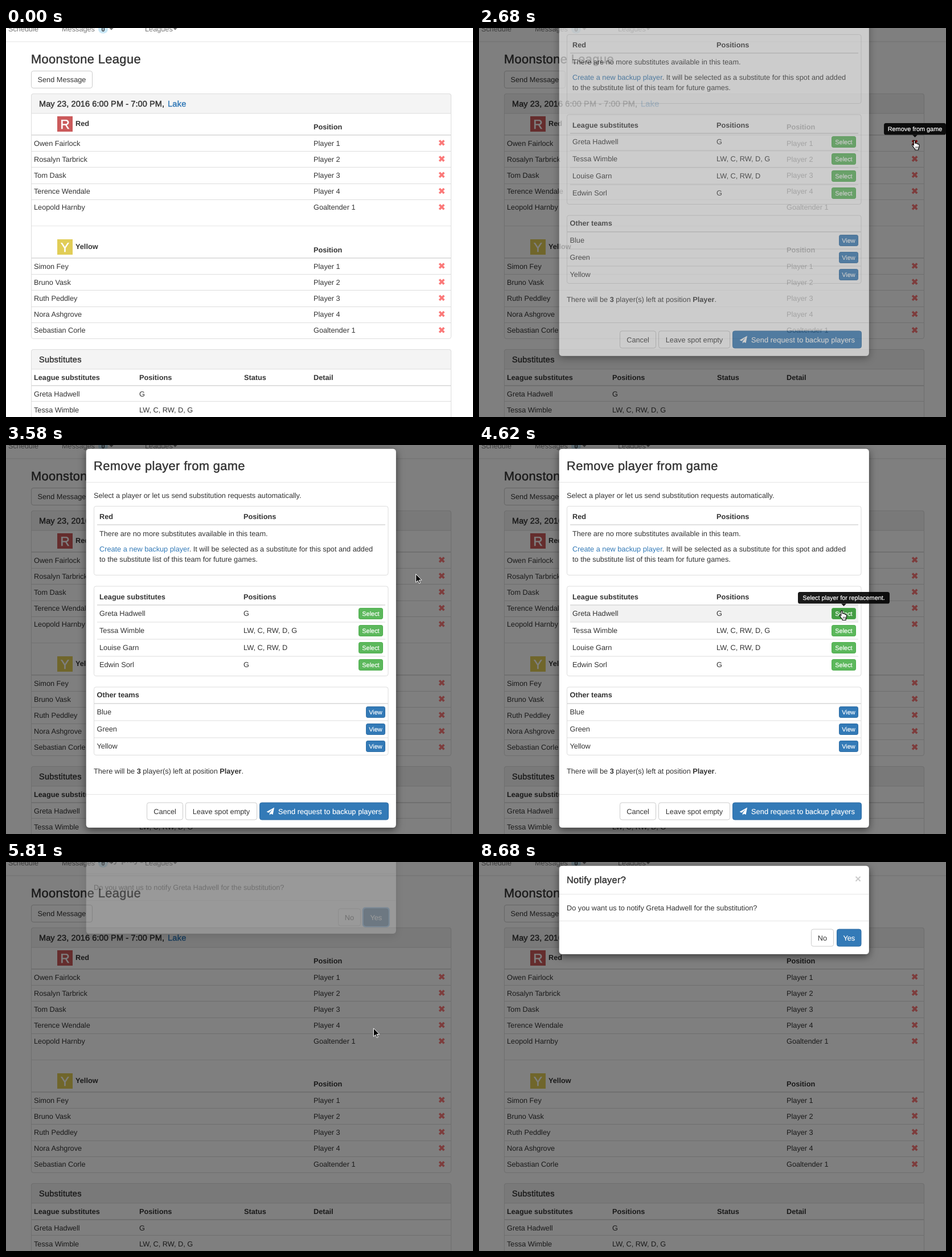
Write an HTML page that moves like this. It is 820 px wide and 683 px high and loops after 8.77 s.

```html
<!DOCTYPE html>
<html lang="en">
<head>
<meta charset="utf-8">
<title>Player substitution</title>
<style>
html, body { margin: 0; width: 100%; height: 100%; overflow: hidden; background: #fff; }
svg { display: block; width: 820px; height: 683px; }
text { font: 12.72px "Liberation Sans", Arial, sans-serif; fill: #333; text-rendering: geometricPrecision; white-space: pre; }
.b { font-weight: bold; }
.small { font-size: 10.9px; }
.med { stroke: #333; stroke-width: .45px; letter-spacing: .018em; }
.h3 { font-size: 21.8px; }
.h4 { font-size: 16.35px; }
.h5 { font-size: 14.53px; }
.date { letter-spacing: .007em; }
.nav { fill: #777; }
.white { fill: #fff; stroke: #fff; stroke-width: .2px; }
.link { fill: #337ab7; }
.med.link { stroke: #337ab7; }
.tile { font-size: 23px; fill: #fff; stroke: #fff; stroke-width: .5px; }
.close { font-size: 19px; font-weight: bold; fill: #000; opacity: .2; }
.mid { text-anchor: middle; }
.sheet { filter: drop-shadow(0 4.5px 7px rgba(0, 0, 0, .5)); }
</style>
</head>
<body>
<svg id="stage" viewBox="0 0 820 683"></svg>
<script>
const LOOP = 8770, STEP = 148.7;

// Markup helpers
const text = (x, y, s, cls = '') => `<text x="${x}" y="${y}" class="${cls}">${s}</text>`;
const rect = (x1, y1, x2, y2, fill, r = 0, extra = '') =>
  `<rect x="${x1}" y="${y1}" width="${x2 - x1}" height="${y2 - y1}" rx="${r}" fill="${fill}" ${extra}/>`;
const box = (x1, y1, x2, y2, fill = '#fff', line = '#ddd', r = 3.6, extra = '') =>
  rect(x1 + .5, y1 + .5, x2 - .5, y2 - .5, fill, r, `stroke="${line}" ${extra}`);
const rule = (x1, x2, y, h = 1, color = '#ddd') => rect(x1, y, x2, y + h, color);
const group = (id, body) => `<g id="${id}">${body}</g>`;
const shade = id => rect(0, 0, 820, 683, '#000', 0, `id="${id}"`);
const caret = x => `<path d="M${x} -.3h8l-4 4z" fill="#777"/>`;
const cross = (y, id = '') =>
  `<path ${id && `id="${id}"`} d="M761 ${y - 4.1}l8.2 8.2m0-8.2l-8.2 8.2" stroke="#fb7878" stroke-width="3.6"/>`;

const button = (x1, y1, x2, y2, label, fill, line, small, id = '') =>
  box(x1, y1, x2, y2, fill, line, small ? 2.7 : 3.6, id && `id="${id}"`) +
  text((x1 + x2) / 2, (y1 + y2) / 2 + (small ? 3.9 : 4.5), label,
    'mid ' + (small ? 'small ' : '') + (fill === '#fff' ? '' : 'white'));

const plain = (x1, y1, x2, y2, label) => button(x1, y1, x2, y2, label, '#fff', '#ccc');

const panelHead = y =>
  `<path d="M44.5 ${y + 35}v-31q0-3.5 3.5-3.5h730q3.5 0 3.5 3.5v31z" fill="#f4f4f4" stroke="#ddd"/>`;

const PITCH = 28.2;
const ROLES = ['Player 1', 'Player 2', 'Player 3', 'Player 4', 'Goaltender 1'];
const SUBS = [['Greta Hadwell', 'G'], ['Tessa Wimble', 'LW, C, RW, D, G'],
  ['Louise Garn', 'LW, C, RW, D'], ['Edwin Sorl', 'G']];

function team(y, name, color, players, id) {
  let s = rect(90, y, 117, y + 27, color) + text(103.5, y + 22, name[0], 'tile mid') +
    text(122, y + 17.3, name, 'b') + text(540, y + 22.8, 'Position', 'b') + rule(45, 781, y + 32, 1.8);
  players.forEach((p, i) => {
    const mid = y + 47 + i * PITCH;
    s += text(49, mid + 4.6, p) + text(540, mid + 4.6, ROLES[i]) + cross(mid - .5, i ? '' : id);
    if (i) s += rule(45, 781, Math.round(mid - 14));
  });
  return s;
}

function page() {
  return rect(0, 0, 820, 683, '#fff') +
    text(4, 6, 'Schedule', 'nav') + text(98, 6, 'Messages', 'nav') +
    rect(162, -6, 179, 9.5, '#c9e7f6', 7.5) + text(170.5, 5.7, '0', 'small b mid') +
    caret(181) + text(244, 6, 'Leagues', 'nav') + caret(293) + rule(0, 820, 23.5, 1, '#e4e4e4') +
    text(44, 62, 'Moonstone League', 'med h3') + plain(44, 75, 152, 106, 'Send Message') +
    box(44, 115, 782, 546) + panelHead(115) +
    text(58, 138.3, 'May 23, 2016 6:00 PM - 7:00 PM,', 'med h5 date') + text(284, 138.3, 'Lake', 'med h5 link') +
    team(155, 'Red', '#cb5a5b',
      ['Owen Fairlock', 'Rosalyn Tarbrick', 'Tom Dask', 'Terence Wendale', 'Leopold Harnby'], 'hot') +
    rule(45, 781, 347, 1, '#e6e6e6') +
    team(371, 'Yellow', '#e1cd57',
      ['Simon Fey', 'Bruno Vask', 'Ruth Peddley', 'Nora Ashgrove', 'Sebastian Corle'], 'cold') +
    box(44, 564, 782, 700) + panelHead(564) + text(58, 587.3, 'Substitutes', 'med h5') +
    text(49, 617.5, 'League substitutes', 'b') + text(234, 617.5, 'Positions', 'b') +
    text(418, 617.5, 'Status', 'b') + text(540, 617.5, 'Detail', 'b') + rule(45, 781, 627, 1.8) +
    SUBS.slice(0, 2).map(([n, p], i) => text(49, 646.7 + i * PITCH, n) + text(234, 646.7 + i * PITCH, p)).join('') +
    rule(45, 781, 655);
}

const sheet = bottom => box(140, 6, 685.5, bottom, '#fff', 'rgba(0,0,0,.2)', 5.4, 'class="sheet"');

function removeDialog() {
  let s = sheet(672.5) + text(154, 43.7, 'Remove player from game', 'med h3') + rule(141, 685, 65, 1, '#e5e5e5') +
    text(154, 93, 'Select a player or let us send substitution requests automatically.') +
    box(154, 107, 671.5, 229) + text(164, 130.4, 'Red', 'b') + text(417, 130.4, 'Positions', 'b') +
    rule(160, 666, 139.2, 1.8) +
    text(164, 159.6, 'There are no more substitutes available in this team.') +
    text(164, 187, '<tspan class="link">Create a new backup player</tspan>. It will be selected as a substitute for this spot and added') +
    text(164, 205, 'to the substitute list of this team for future games.') +
    box(154, 247.5, 671.5, 406) + rect(160, 281, 666, 311, '#f2f2f2', 0, 'id="rowHover"') +
    text(164, 270.6, 'League substitutes', 'b') + text(417, 270.6, 'Positions', 'b') + rule(160, 666, 280, 1.8) +
    rect(617.5, 284.5, 663.5, 307, '#4a9cec', 4, 'id="selectRing"');
  SUBS.forEach(([name, pos], i) => {
    const y = 295.5 + i * 30;
    s += text(164, y + 4.3, name) + text(417, y + 4.3, pos) +
      button(619, y - 9.5, 662, y + 10.5, 'Select', '#5cb85c', '#4cae4c', true, i ? '' : 'select');
    if (i) s += rule(160, 666, y - 15);
  });
  s += box(154, 424.5, 671.5, 545) + text(159.5, 443.4, 'Other teams', 'b') + rule(155, 671, 453, 1.8);
  ['Blue', 'Green', 'Yellow'].forEach((name, i) => {
    const y = 468.5 + i * 30;
    s += text(159.5, y + 4.3, name) + button(632, y - 9.5, 666, y + 10.5, 'View', '#337ab7', '#2e6da4', true);
    if (i) s += rule(155, 671, y - 15);
  });
  return s +
    text(154, 577, 'There will be <tspan class="b">3</tspan> player(s) left at position <tspan class="b">Player</tspan>.') +
    rule(141, 685, 613, 1, '#e5e5e5') +
    plain(247, 627.5, 311, 658.5, 'Cancel') + plain(315, 627.5, 441, 658.5, 'Leave spot empty') +
    box(445, 627.5, 672, 658.5, '#337ab7', '#2e6da4') +
    '<path d="M471 636.5l-13.5 7.6 3.7 1.7 6.8-6.2-5.2 7v3.2l2.2-2.3 3.6 1.5z" fill="#fff"/>' +
    `<g letter-spacing=".1">${text(478, 647.5, 'Send request to backup players', 'white')}</g>`;
}

function notifyDialog() {
  return sheet(162.5) + text(154, 37.3, 'Notify player?', 'med h4') + text(665.5, 36, '×', 'close mid') +
    rule(141, 685, 56, 1, '#e5e5e5') +
    text(154, 84.6, `Do you want us to notify ${SUBS[0][0]} for the substitution?`) +
    rule(141, 685, 103, 1, '#e5e5e5') + plain(583, 117.5, 623, 148.5, 'No') +
    rect(625.7, 115.5, 673.7, 150.5, '#66b0f2', 5, 'id="yesRing"') +
    button(628, 117.5, 671.5, 148.5, 'Yes', '#337ab7', '#2e6da4', false, 'yes');
}

const tip = (x1, y, x2, x, label) => rect(x1, y, x2, y + 20.5, '#000', 3.6, 'opacity=".9"') +
  `<path d="M${x - 4.5} ${y + 20.5}h9l-4.5 4.5z" opacity=".9"/>` + text((x1 + x2) / 2, y + 13.7, label, 'small white mid');

const HAND = 'M3.2 9.5V1.7Q3.2.4 4.5.4T5.8 1.7V6Q6 4.9 7.2 5T8.4 6.4Q8.8 5.5 9.8 5.7T10.8 7.2Q11.4 6.5 12.2 6.9T13 8.6V11Q13 13 11.6 15V17H5.6V15.4Q3.5 13.5 2.4 11.4L.8 9.2Q.3 8 1.3 7.6T3.2 9.5z';
const ARROW = 'M0 0V14.5L3.4 11.4L5.6 16.5L7.8 15.6L5.6 10.6H10.3z';

document.getElementById('stage').innerHTML =
  group('page', page()) + shade('removeShade') + group('remove', removeDialog()) +
  shade('notifyShade') + group('notify', notifyDialog()) +
  group('tipRemove', tip(711, 167, 820, 765.5, 'Remove from game')) +
  group('tipSelect', tip(560, 258, 721, 640.5, 'Select player for replacement.')) +
  group('cursor', `<path id="arrow" d="${ARROW}" stroke="#fff"/>` +
    `<path id="hand" d="${HAND}" fill="#fff" stroke="#000" stroke-width="1.1"/>` +
    '<path id="knuckles" d="M7 11v3.5M9 11v3.5M11 11v3.5" stroke="#000" stroke-width=".7"/>');

const el = {};
document.querySelectorAll('[id]').forEach(n => el[n.id] = n);

// Step tables: [step, opacity, offset], each held until the next entry
const FADES = {
  removeShade: [[0, 0], [18, .5], [38, .325], [39, 0]],
  remove: [[0, 0], [18, .6, -96], [19, 1, -11], [20, 1], [38, .65, -48.3], [39, 0]],
  notifyShade: [[0, 0], [38, .06], [39, .5]],
  notify: [[0, 0], [39, .2, -36], [40, 1, -9], [41, 1]],
  tipRemove: [[0, 0], [15, .5], [16, 1], [22, 0]],
  tipSelect: [[0, 0], [30, .5], [31, 1], [39, 0]]
};
// Cursor moves: first step, last step, from, to
const MOVES = [
  [8, 15, [813, 199], [760, 197]],
  [21, 29, [760, 197], [632.5, 290.5]],
  [38, 44, [632.5, 290.5], [806.5, 309.5]]
];

const ease = p => p * p * (3 - 2 * p);
const show = (node, on) => node.setAttribute('opacity', +on);
const within = (k, a, b) => k >= a && k < b;

function fade(id, k) {
  const [, opacity, dy = 0] = FADES[id].filter(e => e[0] <= k).pop();
  show(el[id], opacity);
  el[id].setAttribute('transform', `translate(0 ${dy})`);
}

function cursorAt(k) {
  const [a, b, from, to] = MOVES.filter(m => m[0] <= k).pop() || MOVES[0];
  const p = ease(Math.min(1, Math.max(0, (k - a) / (b - a))));
  return from.map((v, i) => v + (to[i] - v) * p);
}

function draw(t) {
  const k = Math.floor(t / STEP);
  Object.keys(FADES).forEach(id => fade(id, k));

  el.hot.setAttribute('stroke', within(k, 14, 22) ? '#d90f0f' : '#fb7878');
  show(el.rowHover, within(k, 28, 38));
  el.select.setAttribute('fill', within(k, 29, 39) ? '#449d44' : '#5cb85c');
  show(el.selectRing, within(k, 37, 39));
  const focused = t < 8680;
  show(el.yesRing, focused);
  el.yes.setAttribute('fill', focused ? '#286090' : '#337ab7');
  el.yes.setAttribute('stroke', focused ? '#1f4f79' : '#2e6da4');

  const pointing = within(k, 14, 22) || within(k, 29, 39);
  show(el.cursor, within(k, 8, 45));
  show(el.hand, pointing);
  show(el.knuckles, pointing);
  show(el.arrow, !pointing);
  el.cursor.setAttribute('transform', `translate(${cursorAt(k)})`);
}

const start = performance.now();
function tick() {
  draw((performance.now() - start) % LOOP);
  requestAnimationFrame(tick);
}
tick();
</script>
</body>
</html>
```
